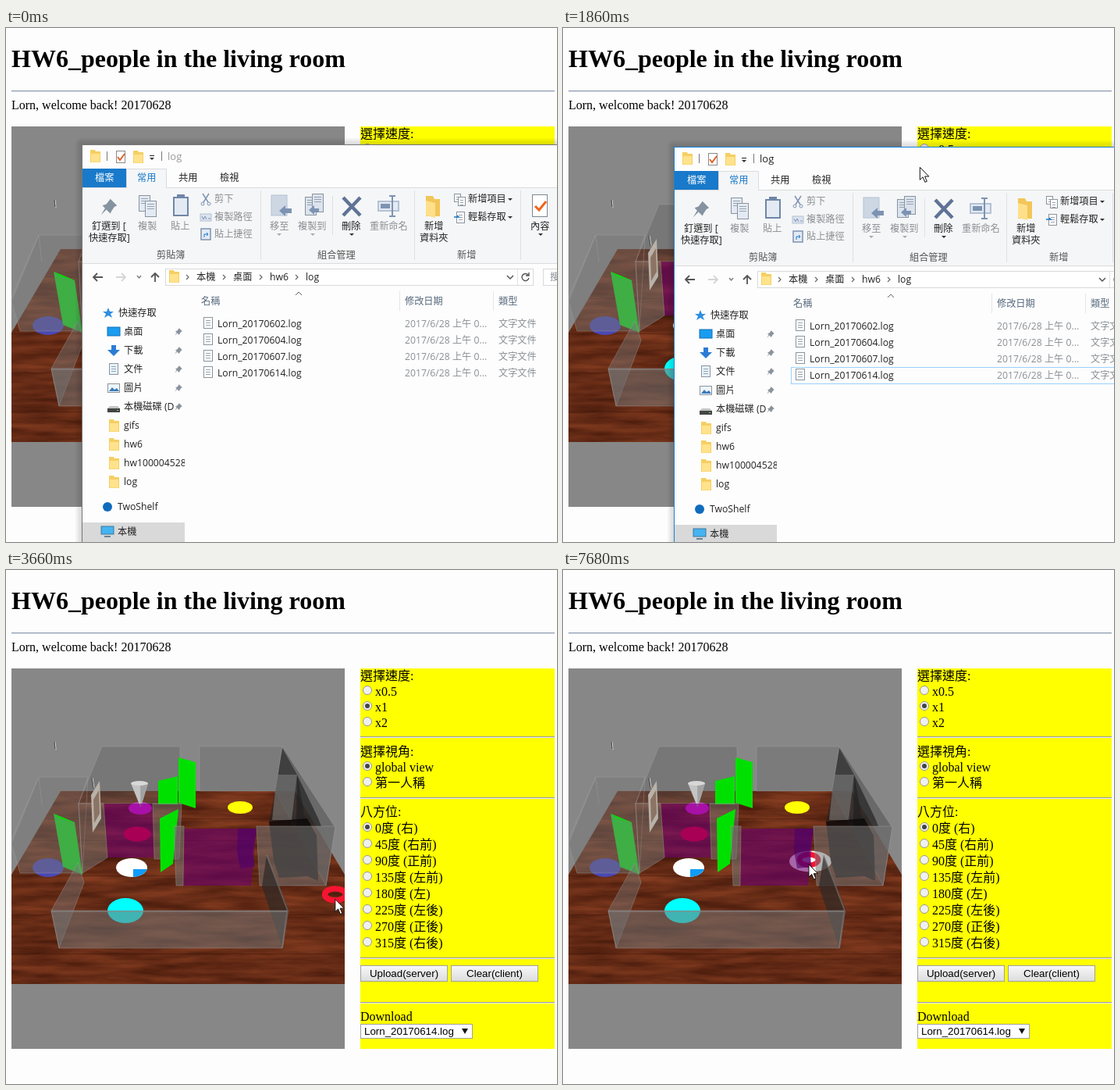
Animation of 706x658 px, one loop 8000 ms. Source, as an HTML page:

```html
<!DOCTYPE html>
<html lang="zh-Hant">
<head>
<meta charset="utf-8">
<title>HW6</title>
<style>
html, body { margin: 0; width: 100%; height: 100%; overflow: hidden; background: #fdfdfd; }
svg { display: block; width: 706px; height: 658px; }
text { white-space: pre; }
.page { font: 16px "Liberation Serif", "Noto Sans CJK TC", "Noto Sans CJK", serif; }
.form { font: 13.33px "Liberation Sans", sans-serif; }
.ui { font: 12.2px "Open Sans", "Noto Sans CJK TC", "Noto Sans CJK", sans-serif; }
</style>
</head>
<body>
<svg id="stage" viewBox="0 0 706 658">
  <defs>
    <filter id="wood" x="0" y="0" width="1" height="1" color-interpolation-filters="sRGB">
      <feTurbulence type="fractalNoise" baseFrequency=".012 .09" numOctaves="4" seed="7"/>
      <feColorMatrix values=".36 0 0 0 .22  .2 0 0 0 .07  .12 0 0 0 .025  0 0 0 0 1"/>
    </filter>
    <linearGradient id="btn" x2="0" y2="1">
      <stop stop-color="#f8f8f8"/><stop offset="1" stop-color="#dcdcdc"/>
    </linearGradient>
    <clipPath id="view"><rect x="7" y="126" width="427" height="487"/></clipPath>
    <clipPath id="floor"><path d="M70 283H370L434 390V530H7V390Z"/></clipPath>
    <clipPath id="nav"><rect x="98" y="340" width="131" height="330"/></clipPath>
  </defs>
</svg>
<script>
const stage = document.getElementById('stage');
const LOOP = 8000, STEP = 60;
const USER = 'Lorn';
const GREY = '#8b8f94', INK = '#222', BLUE = '#1979ca';

const rect = (x, y, w, h, fill, more = '') => `<rect x="${x}" y="${y}" width="${w}" height="${h}" fill="${fill}" ${more}/>`;
const oval = (x, y, rx, ry, fill, more = '') => `<ellipse cx="${x}" cy="${y}" rx="${rx}" ry="${ry}" fill="${fill}" ${more}/>`;
const shape = (d, fill, more = '') => `<path d="${d}" fill="${fill}" ${more}/>`;
const line = (d, color, width = 1) => shape(d, 'none', `stroke="${color}" stroke-width="${width}"`);
const text = (x, y, s, fill = '#000', more = '') => `<text x="${x}" y="${y}" fill="${fill}" ${more}>${s}</text>`;
const group = (body, more = '') => `<g ${more}>${body}</g>`;

function panel() {
  const rule = y => rect(454, y, 249, 1, '#9a9a9a') + rect(454, y + 1, 249, 1, '#eee');
  const radio = (y, label, on) =>
    `<circle cx="463" cy="${y}" r="5.5" fill="#f0f0f0" stroke="#999"/>` +
    (on ? `<circle cx="463" cy="${y}" r="3" fill="#444"/>` : '') + text(473, y + 7, label);
  const button = (x, label) => rect(x + .5, 506.5, 111, 20, 'url(#btn)', 'stroke="#a0a0a0"') +
    text(x + 56, 521, label, '#000', 'class="form" text-anchor="middle"');
  const turns = ['0度 (右)', '45度 (右前)', '90度 (正前)', '135度 (左前)',
    '180度 (左)', '225度 (左後)', '270度 (正後)', '315度 (右後)'];
  return rect(454, 126, 249, 487, '#ff0') +
    text(454, 141, '選擇速度:') + radio(154, 'x0.5') + radio(174, 'x1', true) + radio(194, 'x2') + rule(213) +
    text(454, 238, '選擇視角:') + radio(251, 'global view', true) + radio(271, '第一人稱') + rule(291) +
    text(454, 315, '八方位:') + turns.map((s, i) => radio(329 + i * 21, s, !i)).join('') + rule(496) +
    button(454, 'Upload(server)') + button(570, 'Clear(client)') + rule(553) +
    text(454, 577, 'Download') + rect(454.5, 581.5, 143, 18, '#fff', 'stroke="#a0a0a0"') +
    text(459, 595, USER + '_20170614.log', '#000', 'class="form"') + shape('M584 587h8l-4 7z', '#111');
}

function room() {
  const wall = (d, alpha = .45, tone = 118) => shape(d, `rgba(${tone},${tone},${tone},${alpha})`, 'stroke="rgba(160,160,160,.4)"');
  const green = d => shape(d, '#00e000');
  const violet = 'rgba(110,0,110,.6)';
  return rect(7, 126, 427, 487, '#878787') +
    group(rect(7, 283, 427, 247, '#6e3016', 'filter="url(#wood)"') +
      [318, 346, 391, 441, 491].map(y => rect(7, y, 427, 1, 'rgba(40,10,0,.3)')).join(''), 'clip-path="url(#floor)"') +
    '<ellipse id="pick" fill="#fff"/>' +
    oval(54, 381, 20, 12, '#4a48b4') + oval(168, 338, 17.5, 9.5, '#ff0030') + oval(172, 305, 15, 8, '#ff28ff') +
    oval(300, 304, 16, 8, '#ff0') + oval(153, 436, 23, 16, '#0ff') +
    oval(161, 381, 20, 12, '#fff') + shape('M163 383H181Q177 392 163 393Z', '#109cf8') +
    '<ellipse id="ring" fill="none" stroke="#f81430"/>' +
    // far walls
    wall('M123 226H223V299H93Z', .4, 95) + wall('M248 226H354L345 283H248Z', .35, 100) +
    wall('M42 265H105L93 299L98 388H18L7 350Z', .45) + line('M42 265L7 345M42 265L46 300M105 265L98 388', 'rgba(160,160,160,.4)') +
    wall('M354 226L422 330L410 404L345 283Z', .6, 85) +
    shape('M354 228L373 262L384 322H337L345 283Z', 'rgba(35,35,35,.6)') +
    shape('M347 262H373L366 320H341Z', 'rgba(130,130,130,.55)') +
    shape('M373 262L400 318L404 328H372Z', 'rgba(30,30,30,.65)') +
    shape('M337 322L386 318L398 340L400 398L386 392L350 394L343 372Z', 'rgba(12,10,10,.85)') +
    // pointer cone
    line('M171.500 256V275', '#777', 2) + shape('M160 273H182L172.500 304Z', '#c4c4c4') +
    shape('M172 273H182L172.500 304Z', '#a2a2a2') + oval(171, 273, 11, 3, '#d8d8d8') +
    // doors
    shape('M125 299H188L190 368H130Z', violet) +
    green('M195 270L220 264V300H195Z') + green('M221 240L243 246V305L221 298Z') +
    wall('M93 299H125L130 368L98 388Z', .5) + wall('M188 299H225L222 370H190Z', .5) +
    green('M197 318L221 306L214 376L198 387Z') +
    shape('M61 312L88 323L98 390L73 380Z', '#3fae45') + shape('M61 312L88 323L70 318Z', '#00e000') +
    shape('M109 288L120 270L122 318L111 336Z', '#b8b2a8') + shape('M112 294L119 282L120 312L113 324Z', '#8c7464') +
    line('M63 220L64 230M111 266L113 279', '#ddd') + line('M62 220L63 229M110 266L112 279', '#444') +
    // near walls
    shape('M228 331H321L314 404H227Z', violet) + shape('M297 331H321L316 362L319 380L300 382L296 360Z', 'rgba(75,0,105,.6)') +
    wall('M215 328H228L227 404H218Z', .55) + wall('M321 328H422L410 404H325Z', .55) +
    shape('M334 365L362 435L354 484L328 405Z', 'rgba(45,40,38,.7)') +
    wall('M92 375L58 436L68 484L100 400Z', .45) + wall('M58 436H360L354 484H68Z', .55) +
    line('M58 437H361L354 484M334 365L361 436', 'rgba(135,135,135,.5)', 2);
}

const folder = (x, y) => shape(`M${x} ${y}h6l1 2h6v14h-13z`, '#f5cf62') + rect(x + 1, y + 5, 11, 10.5, '#ffe28c');
const page = (x, y, w = 12, h = 15, tint = '#fff') => rect(x + .5, y + .5, w - 1, h - 1, tint, 'stroke="#8a949e"') +
  [4, 7, 10].map(k => rect(x + 3, y + k, w - 6, 1, '#98a2ac')).join('');
const pin = (x, y, k, fill) => group(shape('M1 -6L6 -1L4 0L2 3L1 5L-2 2L-6 6L-3 1L-5 -1L-2 -2Z', fill), `transform="translate(${x} ${y}) scale(${k})"`);
const angle = (x, y) => line(`M${x} ${y - 3}l3 3l-3 3`, '#666', 1.2);
const drop = (x, y, fill = '#333') => shape(`M${x - 3} ${y}h6l-3 3z`, fill);

function ribbon() {
  const pale = '#b4c2d4', deep = '#7d93b2';
  const labels = [
    [110, 258, '釘選到 ['], [106, 273, '快速存取]'], [430, 258, '刪除'], [536, 258, '新增'], [530, 273, '資料夾'],
    [592, 223, '新增項目'], [592, 246, '輕鬆存取'], [672, 258, '內容']];
  const dim = [[169, 258, '複製'], [211, 258, '貼上'], [267, 223, '剪下'], [267, 246, '複製路徑'], [267, 268, '貼上捷徑'],
    [338, 258, '移至'], [374, 258, '複製到'], [466, 258, '重新命名']];
  const heads = [[193, 295, '剪貼簿'], [399, 295, '組合管理'], [578, 295, '新增']];
  const put = (list, fill) => list.map(([x, y, s]) => text(x, y, s, fill)).join('');
  return rect(98, 204, 900, 97, '#f5f6f7') + rect(98, 301, 900, 1, '#dadbdc') + rect(98, 204, 900, 1, '#dadbdc') +
    rect(98, 180, 56, 24, BLUE) + shape('M154.500 205V180.500H205.500V205', '#f5f6f7', 'stroke="#dadbdc"') +
    text(114, 196, '檔案', '#fff') + text(168, 196, '常用', BLUE) + text(221, 196, '共用', INK) + text(274, 196, '檢視', INK) +
    [326, 523, 659].map(x => rect(x, 208, 1, 89, '#dfe0e1')).join('') + rect(418, 215, 1, 50, '#dfe0e1') +
    put(labels, INK) + put(dim, GREY) + put(heads, '#555') +
    pin(132, 229, 1.7, '#8593a0') +
    page(170, 214, 15, 21, '#e3eaf3') + page(178, 221, 15, 21, '#e3eaf3') +
    rect(215, 217, 18, 23, '#e3eaf3', 'stroke="#6f86a8" stroke-width="2"') + rect(219, 213, 10, 5, '#6f86a8') +
    line('M252 212L259 223M260 212L253 223', deep, 1.5) + oval(252, 225, 2, 2, 'none', `stroke="${deep}"`) + oval(260, 225, 2, 2, 'none', `stroke="${deep}"`) +
    rect(249, 238, 14, 9, '#dbe3ee', `stroke="${pale}"`) + line('M251 241l2 4l2 -4l2 4M259 244h3', deep) +
    rect(250, 257, 12, 14, '#e3eaf3', `stroke="${deep}" stroke-width="1.500"`) + line('M254 268v-4h5m-2 -2l2 2l-2 2', BLUE) +
    rect(340, 214, 20, 26, '#cdd7e4', `stroke="${pale}"`) + shape('M350 234l8 -7v4h8v6h-8v4z', deep) +
    page(383, 216, 15, 24, '#dbe3ee') + page(392, 212, 15, 24, '#dbe3ee') + shape('M388 233l7 -6v4h6v5h-6v3z', deep) +
    line('M432 217L454 240M454 217L432 240', '#5f7396', 4.5) +
    rect(477, 222, 26, 12, '#e3eaf3', `stroke="${pale}" stroke-width="2"`) + rect(480, 225, 12, 6, deep) + line('M491 215h8m-4 0v26m-4 0h8', deep, 2) +
    shape('M538 215h9l2 4h7v22h-18z', '#f2c659') + shape('M538 221l12 3v19l-12 -3z', '#ffe08a') +
    page(574, 212, 9, 11) + page(579, 216, 10, 12) + page(577, 235, 11, 15) + line('M574 242h6l-2 -2', BLUE, 1.5) +
    rect(674.5, 213.5, 19, 28, '#fff', 'stroke="#7c8894"') + line('M678 228l5 5l9 -11', '#f0641e', 3) +
    drop(350, 263, '#aaa') + drop(393, 263, '#aaa') + drop(443, 263) + drop(685, 263) + drop(646, 218) + drop(646, 241);
}

function sidebar() {
  const items = ['桌面', '下載', '文件', '圖片', '本機磁碟 (D', 'gifs', 'hw6', 'hw100004528', 'log'];
  const icons = [
    rect(130, 383, 16, 11, '#1a9cf0', 'stroke="#1270b8"'),
    shape('M135 406h6v6h5l-8 8l-8 -8h5z', '#2b7cd3'),
    page(132, 429, 12, 15, '#e6f3fd'),
    rect(130.5, 455.5, 15, 11, '#eef6fc', 'stroke="#8a949e"') + shape('M132 465l4 -5l3 3l3 -2l3 4z', '#3a7ab8'),
    shape('M133 484h10l3 3h-16z', '#c4c4c4') + rect(130, 487, 16, 5, '#444') + rect(142, 489, 2, 1, '#5f5')];
  const rows = items.map((s, i) => {
    const y = 389 + i * 24;
    return (icons[i] || folder(132, y - 8)) + text(151, y + 4, s, INK) + (i < 5 ? pin(221, y, .8, '#8a939c') : '');
  });
  return group(rect(98, 633, 131, 40, '#d9d9d9') +
    shape('M131 358l2 5h5l-4 3l2 5l-5 -3l-5 3l2 -5l-4 -3h5z', '#2f8ee0') + text(144, 369, '快速存取', INK) +
    rows.join('') + `<circle cx="130" cy="613" r="6" fill="#0f6cbd"/>` + text(143, 617, 'TwoShelf', INK) +
    rect(122, 638, 16, 10, '#45b4f0', 'stroke="#3c78a0"') + rect(126, 650, 8, 2, '#68859a') + text(143, 649, '本機', INK),
    'clip-path="url(#nav)"');
}

function explorer() {
  const edge = [8, 6, 4, 2].map(k => rect(97 - k, 149 - k, 900, 900, 'rgba(0,0,0,.035)', `rx="${k}"`)).join('');
  const days = ['02', '04', '07', '14'];
  const files = days.map((d, i) => {
    const y = 378 + i * 21;
    return page(253, y - 8, 12, 15) + text(271, y + 5, `${USER}_201706${d}.log`, INK) +
      text(511, y + 5, '2017/6/28 上午 0...', GREY) + text(631, y + 5, '文字文件', GREY);
  }).join('');
  const crumbs = [[244, '本機'], [291, '桌面'], [338, 'hw6'], [384, 'log']];
  return edge + rect(97.5, 149.5, 900, 900, '#fdfdfd', 'id="frame"') +
    folder(108, 156) + rect(129, 158, 1, 12, '#777') + rect(141.5, 157.5, 11, 15, '#fff', 'stroke="#8a8a8a"') +
    line('M143 165l3 4l6 -8', '#e0622a', 2) + folder(163, 157) + rect(184, 163, 6, 1, INK) + drop(187, 166) + rect(199, 158, 1, 12, '#777') +
    text(207, 169, 'log', '#999', 'id="caption" font-size="13"') + ribbon() +
    line('M124 319H112m5 -5l-5 5l5 5', '#555', 1.8) + line('M141 319h12m-5 -5l5 5l-5 5', '#d5d5d5', 1.8) +
    line('M168 317l2.500 3l2.500 -3', '#777', 1.3) + line('M191 325V314m-5 5l5 -5l5 5', '#555', 1.8) +
    rect(204.5, 308.500, 471, 21, '#fff', 'stroke="#d9d9d9"') + rect(655, 309, 1, 20, '#e2e2e2') +
    rect(335, 309, 44, 20, '#e5f3ff', 'id="crumb" stroke="#cce8ff"') +
    folder(209, 310) + angle(231, 319) + crumbs.map(([x, s]) => text(x, 323, s, INK)).join('') +
    [278, 325, 371].map(x => angle(x, 319)).join('') + line('M642 317l4 4l4 -4', '#555', 1.5) +
    line('M669 316a4.500 4.500 0 1 0 1 4M670 313v4h-4', '#555', 1.4) +
    rect(688.5, 308.5, 180, 21, '#fff', 'stroke="#d9d9d9"') + text(697, 323, '搜尋 log', GREY) +
    line('M371 342l4 -4l4 4', '#666') + rect(504, 337, 1, 25, '#e5e5e5') + rect(624, 337, 1, 25, '#e5e5e5') +
    text(250, 354, '名稱', '#56687c') + text(511, 354, '修改日期', '#56687c') + text(631, 354, '類型', '#56687c') +
    rect(247, 368, 600, 21, '#e5f3ff', 'id="row"') + rect(98, 377, 131, 24, '#e5f3ff', 'id="item"') +
    rect(247.5, 431.5, 600, 21, 'none', 'id="focus" stroke="#99d1ff"') + files + sidebar();
}

stage.insertAdjacentHTML('beforeend',
  group(text(7, 50, 'HW6_people in the living room', '#000', 'font-size="32" font-weight="700"') +
    rect(7, 80, 696, 1, '#8e9aae') + rect(7, 81, 696, 1, '#dde2ea') +
    text(7, 104, USER + ', welcome back! 20170628') + group(room(), 'clip-path="url(#view)"') + panel(), 'class="page"') +
  group(explorer(), 'id="win" class="ui"') +
  group(shape('M0 0V16L3.700 12.500L6.500 19L9 18L6.200 11.700H11.500Z', '#fff', 'stroke="#111"'), 'id="mouse"'));

const el = Object.fromEntries(['pick', 'ring', 'win', 'frame', 'caption', 'crumb', 'row', 'item', 'focus', 'mouse']
  .map(id => [id, document.getElementById(id)]));
const set = (node, attrs) => { for (const k in attrs) node.setAttribute(k, attrs[k]); };
const show = (node, on) => { node.style.display = on ? '' : 'none'; };

// time, x, y of the mouse
const path = [
  [60, 720, 60], [120, 625, 105], [240, 560, 230], [360, 437, 365], [420, 408, 397], [480, 303, 457], [540, 255, 485],
  [660, 216, 365], [780, 160, 437], [900, 250, 486], [960, 340, 500], [1020, 397, 468], [1080, 345, 318],
  [1140, 424, 308], [1320, 520, 240], [1500, 470, 140], [1740, 412, 175], [1920, 480, 180], [2160, 655, 182],
  [2340, 897, 203], [2520, 1120, 190], [2940, 720, 540], [3000, 572, 482], [3360, 405, 372], [3540, 405, 372],
  [3960, 464, 545], [4380, 293, 322], [4560, 223, 318], [4860, 190, 306], [5100, 175, 310], [5520, 175, 310],
  [5940, 235, 302], [6300, 303, 309], [6720, 303, 309], [7260, 315, 377], [8000, 315, 377]];
const picks = [[5280, 172, 305, 22.5], [6420, 300.5, 304.5, 22.5], [7680, 317, 373, 27]];
const grab = [412, 175];

function mouseAt(t) {
  const i = path.findIndex(p => p[0] >= t);
  if (i < 1) return [path[0][1], path[0][2]];
  const [t0, x0, y0] = path[i - 1], [t1, x1, y1] = path[i], k = (t - t0) / (t1 - t0);
  return [x0 + (x1 - x0) * k, y0 + (y1 - y0) * k];
}

// the ring keeps its last place while the mouse is off the floor
function ringAt(t) {
  for (; t >= 3000; t -= STEP) {
    const [x, y] = mouseAt(t);
    if (x < 425 && y < 500) return [x, y - 6];
  }
  return [408, 367];
}

function draw(now) {
  const t = Math.floor(now % LOOP / STEP) * STEP;
  const [x, y] = mouseAt(t);
  const away = t < 120 || t >= 2520 && t < 3000;
  show(el.mouse, !away);
  set(el.mouse, { transform: `translate(${x} ${y})` });

  const active = t >= 1800;
  const dx = active ? x - grab[0] : 0, dy = active ? y - grab[1] : 0;
  show(el.win, t < 2520);
  set(el.win, { transform: `translate(${Math.round(dx)} ${Math.round(dy)})` });
  set(el.frame, { stroke: active ? '#1883d7' : '#777' });
  set(el.caption, { fill: active ? '#222' : '#999' });
  show(el.focus, active);

  const [hx, hy] = mouseAt(Math.max(0, t - STEP));
  const hover = !active && t >= 120;
  const row = Math.floor((hy - 368) / 21), item = Math.floor((hy - 377) / 24);
  show(el.row, hover && hx > 247 && row >= 0 && row < 4);
  set(el.row, { y: 368 + row * 21 });
  show(el.item, hover && hx < 229 && item >= -1 && item < 9);
  set(el.item, { y: 377 + item * 24 });
  show(el.crumb, hover && hx > 335 && hx < 380 && hy > 308 && hy < 330);

  const [rx, ry] = ringAt(t), r = 10 + (ry - 304) * .03;
  set(el.ring, { cx: rx, cy: ry, rx: r, ry: r * .57, 'stroke-width': r * .55 });
  const pick = picks.filter(p => t >= p[0]).pop();
  show(el.pick, pick);
  if (pick) set(el.pick, { cx: pick[1], cy: pick[2], rx: pick[3], ry: pick[3] * .5 });
}

const start = performance.now();
function tick() {
  draw(performance.now() - start);
  requestAnimationFrame(tick);
}
tick();
</script>
</body>
</html>
```
